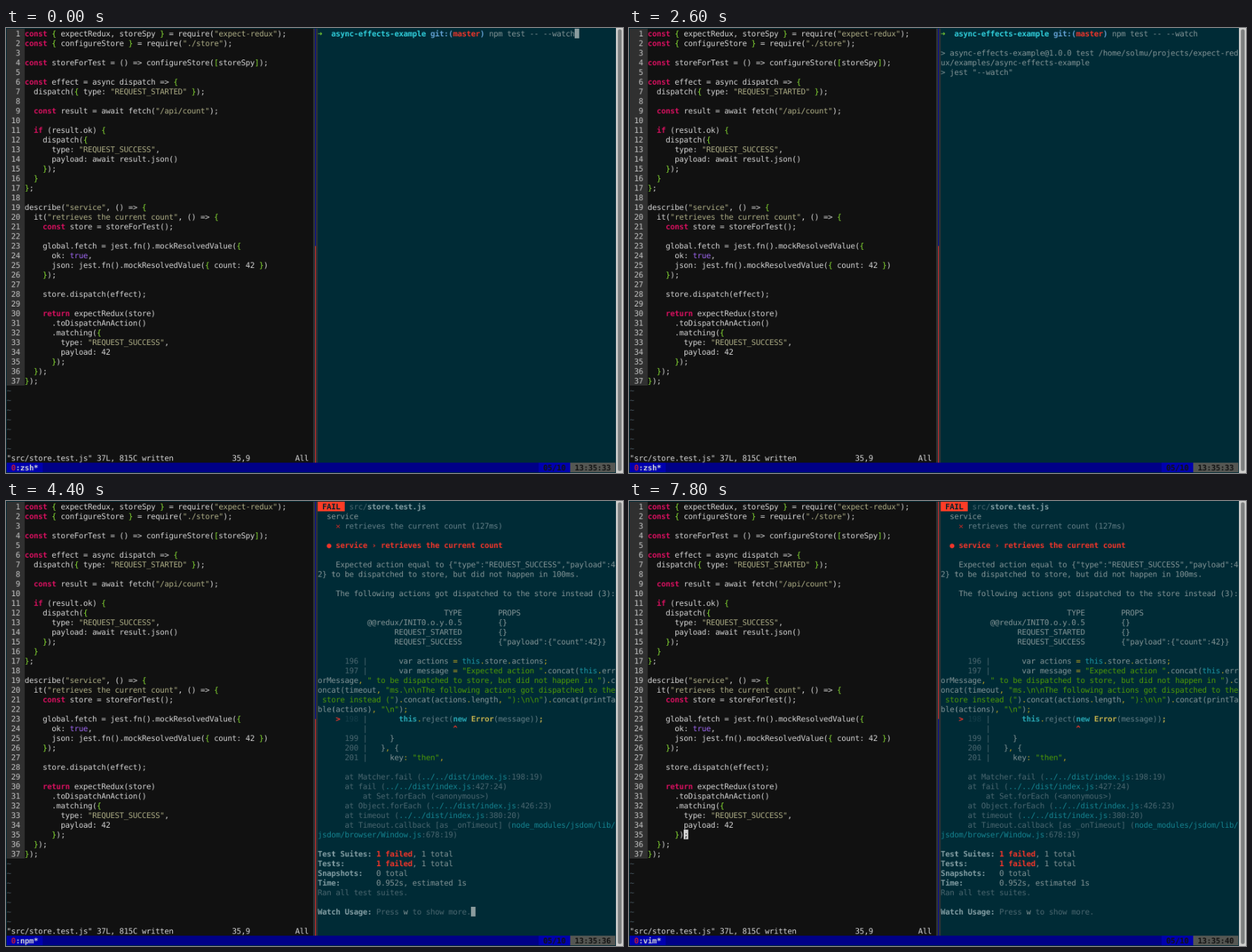
Write an HTML page that moves like this. It is 880 px wide and 636 px high and loops after 8000 ms.

```html
<!DOCTYPE html>
<html lang="en">
<head>
<meta charset="utf-8">
<title>Terminal session</title>
<style>
:root { --cw: 7px; --ch: 15px; }
html, body { margin: 0; width: 100%; height: 100%; overflow: hidden; background: #002b36; }
#stage { position: relative; width: 880px; height: 636px; overflow: hidden; }
/* laid out on whole cells, then scaled down as one soft image */
#screen {
  width: 958px; height: 692px; background: #002b36;
  transform: scale(calc(880 / 958), calc(636 / 692));
  transform-origin: 0 0; will-change: transform;
}
#stage div, pre { position: absolute; margin: 0; }
pre {
  padding-top: 1px;
  font: 12px/var(--ch) "DejaVu Sans Mono", monospace;
  letter-spacing: -.2246px; /* 7px cells */
  text-rendering: geometricPrecision;
  font-variant-ligatures: none;
  white-space: pre;
}
i { font-style: normal; }
.grid { left: 1px; top: 1px; }
.cell {
  left: calc(var(--x) * var(--cw)); top: calc(var(--y) * var(--ch));
  width: calc(var(--n, 1) * var(--cw)); height: calc(var(--h, 1) * var(--ch));
}
pre.cell { width: auto; height: auto; }

/* editor */
#editor { background: #111; }
#gutter { background: #303030; }
#code { color: #d7d7d7; }
.num { color: #c6c6c6; }
.key { color: #d7105f; font-weight: bold; }
.str { color: #afaf87; }
.brace { color: #8ae234; }
.bool { color: #a068f4; }
.tilde { color: #4a5a64; }
.caret { background: #d4d4d4; }
.caret pre { color: #111; }

/* split line */
#split { background: #2e3436; }
.rule { left: 3px; width: 1px; height: 100%; background: #0000af; }
.active { left: 3px; width: 1px; height: 50%; background: #ef2929; }
#upper { top: 0; }
#lower { bottom: 0; }

/* shell */
#shell { left: 484px; top: 1px; color: #839496; }
.block { background: #8b9c9e; }
.c { color: #30cedb; font-weight: bold; }
.b { color: #62a0d2; font-weight: bold; }
.r { color: #f0352a; font-weight: bold; }
.x { color: #cc2a24; }
.g { color: #78cc32; font-weight: bold; }
.w { color: #839ea4; font-weight: bold; }
.d { color: #4b6770; }
.dd { color: #163f4a; }
.s { color: #4e9a06; }
.y { color: #c4a820; }
.k { color: #1c98a8; }
.p { color: #158491; }
.m { color: #647f87; }
.n { color: #27a5b2; font-weight: bold; }
.e { color: #bfae4c; font-weight: bold; }
.tag { background: #ffdf3a; }
.fail .tag { background: #ff3c26; }
.label { color: #06222b; font-weight: bold; }

/* status line */
#bar { background: #000087; }
.tab { background: #0000af; }
.clock { background: #555753; }
.name { color: #ccd0d8; font-weight: bold; }
.name i { color: #c0183c; }
.ink { color: #121212; font-weight: bold; }

#track { left: 947px; top: 0; width: 11px; height: 692px; background: #d0d0ce; }
#thumb { left: 950px; top: 2px; width: 6px; height: 687px; border-radius: 3px; background: #7e8080; }

/* hard cuts on an 8 s loop */
[class*="t-"] { animation: 8s step-end infinite; }
.t-typed { animation-name: typed; }
.t-enter { animation-name: enter; }
.t-prompt { animation-name: prompt; }
.t-output { animation-name: output; }
.t-runs { animation-name: runs; }
.t-fail { animation-name: failed; }
.t-wait { animation-name: waiting; }
.t-zsh { animation-name: zsh; }
.t-npm { animation-name: npm; }
.t-right { animation-name: right; }
.t-vim { animation-name: vim; }
@keyframes typed { 0% { visibility: visible } 25%, 100% { visibility: hidden } }
@keyframes enter { 0% { visibility: hidden } 25% { visibility: visible } 30%, 100% { visibility: hidden } }
@keyframes prompt { 0% { visibility: visible } 42.5%, 100% { visibility: hidden } }
@keyframes output { 0% { visibility: hidden } 30% { visibility: visible } 42.5%, 100% { visibility: hidden } }
@keyframes runs { 0% { visibility: hidden } 42.5% { visibility: visible } 52.5%, 100% { visibility: hidden } }
@keyframes failed { 0% { visibility: hidden } 52.5%, 100% { visibility: visible } }
@keyframes waiting { 0% { visibility: hidden } 52.5% { visibility: visible } 75%, 100% { visibility: hidden } }
@keyframes zsh { 0% { visibility: visible } 37.5%, 100% { visibility: hidden } }
@keyframes npm { 0% { visibility: hidden } 37.5% { visibility: visible } 75%, 100% { visibility: hidden } }
@keyframes right { 0% { visibility: visible } 75%, 100% { visibility: hidden } }
@keyframes vim { 0% { visibility: hidden } 75%, 100% { visibility: visible } }
</style>
</head>
<body>
<div id="stage">
<div id="screen">
  <div class="grid">
    <div id="editor" class="cell" style="--x:0;--y:0;--n:68;--h:45"></div>
    <div id="gutter" class="cell" style="--x:0;--y:0;--n:4;--h:37"></div>
    <pre id="code"></pre>
    <div class="cell caret t-vim" style="--x:12;--y:34"><pre>;</pre></div>
    <div id="split" class="cell" style="--x:68;--y:0;--h:45">
      <div class="rule"></div>
      <div id="lower" class="active t-right"></div>
      <div id="upper" class="active t-vim"></div>
    </div>
  </div>

  <div id="shell">
    <pre class="t-prompt"><i class="g">➜</i>  <i class="c">async-effects-example</i> <i class="b">git:(</i><i class="r">master</i><i class="b">)</i> npm test -- --watch</pre>
    <div class="cell block t-typed" style="--x:57;--y:0"></div>
    <div class="cell block t-enter" style="--x:0;--y:1"></div>
    <pre class="cell t-output" style="--x:0;--y:2">&gt; async-effects-example@1.0.0 test /home/solmu/projects/expect-red
ux/examples/async-effects-example
&gt; jest "--watch"</pre>

    <div class="t-runs">
      <div class="cell tag" style="--x:0;--y:1;--n:6"></div>
      <pre class="cell" style="--x:0;--y:1"> <i class="label">RUNS</i>  <i class="d">src/</i><i class="w">store.test.js</i></pre>
    </div>

    <div class="fail t-fail">
      <div class="cell tag" style="--x:0;--y:0;--n:6"></div>
      <pre> <i class="label">FAIL</i>  <i class="d">src/</i><i class="w">store.test.js</i>
  service
    <i class="x">✕</i> <i class="m">retrieves the current count (127ms)</i>

<i class="r">  ● service › retrieves the current count</i>

    Expected action equal to {"type":"REQUEST_SUCCESS","payload":4
2} to be dispatched to store, but did not happen in 100ms.

    The following actions got dispatched to the store instead (3):

                            TYPE        PROPS
           @@redux/INIT0.o.y.0.5        {}
                 REQUEST_STARTED        {}
                 REQUEST_SUCCESS        {"payload":{"count":42}}

<i class="d">      196 |</i>       var actions <i class="y">=</i> <i class="k">this</i><i class="y">.</i>store<i class="y">.</i>actions<i class="y">;</i>
<i class="d">      197 |</i>       var message <i class="y">=</i> <i class="s">"Expected action "</i><i class="y">.</i>concat(<i class="k">this</i><i class="y">.</i>err
orMessage<i class="y">,</i> <i class="s">" to be dispatched to store, but did not happen in "</i>)<i class="y">.</i>c
oncat(timeout<i class="y">,</i> <i class="s">"ms.\n\nThe following actions got dispatched to the</i>
<i class="s"> store instead ("</i>)<i class="y">.</i>concat(actions<i class="y">.</i>length<i class="y">,</i> <i class="s">"):\n\n"</i>)<i class="y">.</i>concat(printTa
ble(actions)<i class="y">,</i> <i class="s">"\n"</i>)<i class="y">;</i>
    <i class="r">&gt;</i> <i class="dd">198</i> <i class="d">|</i>       <i class="n">this</i><i class="y">.</i><i class="m">reject(</i><i class="n">new</i> <i class="e">Error</i><i class="m">(message))</i><i class="e">;</i>
<i class="d">          |</i>                   <i class="r">^</i>
<i class="d">      199 |</i>     }
<i class="d">      200 |</i>   }<i class="y">,</i> {
<i class="d">      201 |</i>     key<i class="y">:</i> <i class="s">"then"</i><i class="y">,</i>

<i class="d">      at Matcher.fail (<i class="p">../../dist/index.js</i>:198:19)
      at fail (<i class="p">../../dist/index.js</i>:427:24)
          at Set.forEach (&lt;anonymous&gt;)
      at Object.forEach (<i class="p">../../dist/index.js</i>:426:23)
      at timeout (<i class="p">../../dist/index.js</i>:380:20)
      at Timeout.callback [as _onTimeout] (<i class="p">node_modules/jsdom/lib/
jsdom/browser/Window.js</i>:678:19)</i>

<i class="w">Test Suites: </i><i class="r">1 failed</i>, 1 total
<i class="w">Tests:       </i><i class="r">1 failed</i>, 1 total
<i class="w">Snapshots:   </i>0 total
<i class="w">Time:        </i>0.952s, estimated 1s
<i class="d">Ran all test suites.</i>

<i class="w">Watch Usage: </i><i class="d">Press </i>w<i class="d"> to show more.</i></pre>
    </div>
    <div class="cell block t-wait" style="--x:34;--y:42"></div>
  </div>

  <div class="grid">
    <div id="bar" class="cell" style="--x:0;--y:45;--n:135"></div>
    <div class="cell tab" style="--x:0;--y:45;--n:8"></div>
    <div class="cell tab" style="--x:118;--y:45;--n:7"></div>
    <div class="cell clock" style="--x:125;--y:45;--n:10"></div>
    <pre class="cell ink" style="--x:119;--y:45">05/10</pre>
    <pre class="cell name t-zsh" style="--x:1;--y:45"><i>0</i>:zsh*</pre>
    <pre class="cell name t-npm" style="--x:1;--y:45"><i>0</i>:npm*</pre>
    <pre class="cell name t-vim" style="--x:1;--y:45"><i>0</i>:vim*</pre>
    <pre class="cell ink t-zsh" style="--x:126;--y:45">13:35:33</pre>
    <pre class="cell ink t-npm" style="--x:126;--y:45">13:35:36</pre>
    <pre class="cell ink t-vim" style="--x:126;--y:45">13:35:40</pre>
  </div>

  <div id="track"></div>
  <div id="thumb"></div>
</div>
</div>

<script>
const program = `const { expectRedux, storeSpy } = require("expect-redux");
const { configureStore } = require("./store");

const storeForTest = () => configureStore([storeSpy]);

const effect = async dispatch => {
  dispatch({ type: "REQUEST_STARTED" });

  const result = await fetch("/api/count");

  if (result.ok) {
    dispatch({
      type: "REQUEST_SUCCESS",
      payload: await result.json()
    });
  }
};

describe("service", () => {
  it("retrieves the current count", () => {
    const store = storeForTest();

    global.fetch = jest.fn().mockResolvedValue({
      ok: true,
      json: jest.fn().mockResolvedValue({ count: 42 })
    });

    store.dispatch(effect);

    return expectRedux(store)
      .toDispatchAnAction()
      .matching({
        type: "REQUEST_SUCCESS",
        payload: 42
      });
  });
});`;

const span = (kind, text) => `<i class="${kind}">${text}</i>`;

const highlight = line => line.replace(
  /("[^"]*")|\b(const|if|return)\b|\b(true)\b|[{}[\]]/g,
  (text, str, key, bool) =>
    span(str ? "str" : key ? "key" : bool ? "bool" : "brace", text));

const rows = program.split("\n").map((line, i) =>
  span("num", String(i + 1).padStart(3)) + " " + highlight(line));
const filler = Array(7).fill(span("tilde", "~"));
const message = '"src/store.test.js" 37L, 815C written'.padEnd(50) + "35,9".padEnd(14) + "All";

document.getElementById("code").innerHTML = [...rows, ...filler, message].join("\n");
</script>
</body>
</html>
```
